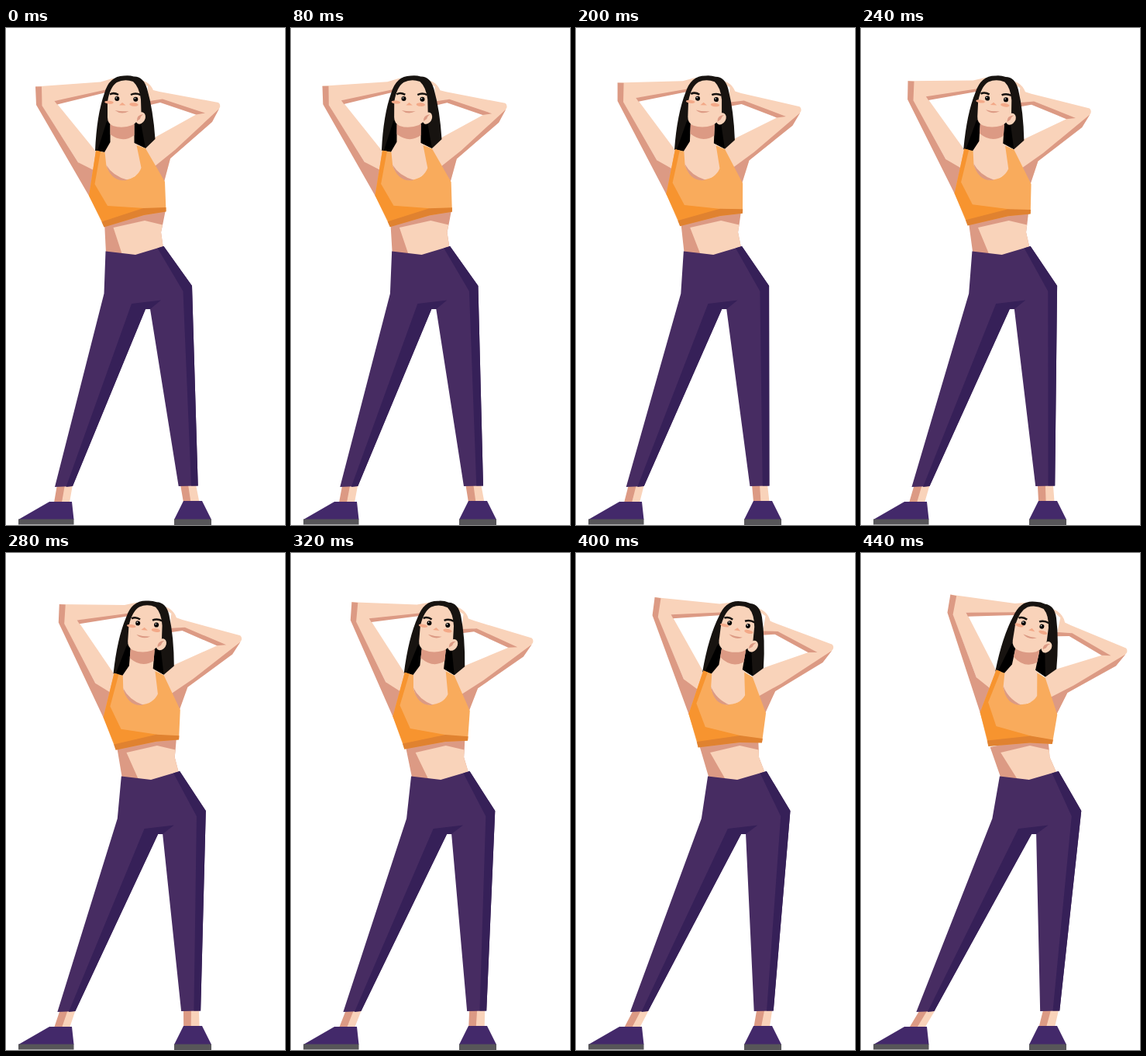
Recreate the animation shown at these times as an HTML page. Size 360 by 640 pixels, loop 0.48 s.

```html
<!DOCTYPE html>
<html lang="en">
<head>
<meta charset="utf-8">
<title>Side stretch</title>
<style>
  :root { --p: 0; --shift: calc(51px * var(--p)); }
  html, body { margin: 0; width: 100%; height: 100%; overflow: hidden; background: #fff; }
  svg { display: block; width: 360px; height: 640px; }

  /* The body leans as --p goes from 0 to 1. */
  .waist { transform-origin: 0 288px; transform: translateX(var(--shift)) skewX(calc(16.7deg * var(--p))); }
  .ankles { transform-origin: 0 612px; transform: skewX(calc(-23deg * var(--p))); }
  .legs { transform-origin: 0 651px; transform: skewX(calc(-7.9deg * var(--p))); }
  .upper { transform-origin: 156px 190px; transform: translateX(var(--shift)) rotate(calc(12deg * var(--p))); }
  .crown { transform-origin: 155px 155px; transform: rotate(calc(-3deg * var(--p))); }
  .eyes { transform: translateX(calc(-2px * var(--p))); }

  .skin { fill: #f9d3ba; }
  .shade { fill: #dc9a84; }
  .hair { fill: #171310; }
  .dark { fill: #000; }
  .top { fill: #f9ab5c; }
  .side { fill: #f7942f; }
  .hem { fill: #e08230; }
  .pants { fill: #472c62; }
  .fold { fill: #362058; }
  .shoe { fill: #43296a; }
  .sole { fill: #575659; }
  .blush { fill: #f3a988; }
  .brow { fill: none; stroke: #171310; stroke-width: 2.5; }
  .glint { fill: #fff; }
</style>
</head>
<body>
<svg viewBox="0 0 360 640">
  <g class="waist">
    <path class="shade" d="M127 250L206 234L202 254L200 263L203 284L167 294L129 290Z"/>
    <path class="skin" d="M138.500 257L179 248L202 253.500L200 263L203 284L167 294L150 292Z"/>
  </g>
  <g class="ankles">
    <path class="shade" d="M66 588H77L72.500 611H62ZM225 588H236L239 611H229Z"/>
    <path class="skin" d="M76 588H86L82 611H72ZM235 588H245L249.500 611H238.500Z"/>
  </g>
  <g class="legs">
    <path class="pants" d="M128.500 287.500L167 292L203.500 281L240 332L247.700 589.500L222.700 590L186 362H180L86 590L63 591L126.500 342Z"/>
    <path class="fold" d="M162 355L200 350.500L186 362H180L86 590L77.500 591ZM203.500 281L240 332L247.700 589.500H239L228.500 339L195.500 283.500Z"/>
  </g>
  <path class="shoe" d="M16 633L56 610H85L87.500 633ZM217 633L229 609H253L265 633Z"/>
  <path class="sole" d="M16 632.500H87.500V639.500H16ZM217 632.500H265V640H217Z"/>

  <g class="upper">
    <!-- arms -->
    <path class="skin" d="M38 75.500L122 69.500L137 65H150V79L131 82L63 94L116 159L115 190L93 173L46 100Z"/>
    <path class="shade" d="M38 75.500H46L46.500 100L93 173L113 183L107.500 217L39 99ZM62.500 94L131 79V82.500L66 98.500Z"/>
    <path class="skin" d="M165 66Q184 66 190 80L198 82L274 96Q277 98 276 102L266 120L212 168L204 198L180 185V151L192 141L246 111L200 92L183 96V75Z"/>
    <path class="shade" d="M182 94.500L202 91.500L257 109.500L245 111.500L199 96L182 100ZM275 104L266 121L212 168L204 198L192 178L218 157Z"/>

    <!-- hair, neck and chest -->
    <g class="crown">
      <path class="hair" d="M152 61.500Q133 62 127 84Q117 112 115 158L128 160L136 147V120H165V148L180 155L192.500 143Q190 106 182 78Q177 62 165 62.500Q159 60.500 152 61.500Z"/>
      <path class="dark" d="M130 120H140V140L128 160L118 158ZM161 122H174L180 155L165 148Z"/>
    </g>
    <path class="skin" d="M134.500 124H165.500V148L180 155V182L155 198L136 196L125 178L127 160L134.500 147Z"/>
    <path class="shade" d="M134.500 122H165.500V138Q151 149 134.500 137Z"/>

    <!-- sports top -->
    <path class="top" d="M116 158L127.500 160L129.500 178Q138 196 153 196Q170 193 174.500 180L168.500 151L180 155L205 198L206.500 236L178 241L126.500 256L107 216Z"/>
    <path class="shade" d="M129 176Q138 191 157 195.700Q137 200 129 176Z"/>
    <path class="side" d="M116 158L122 159L114.500 201L131 229L178 232L125 251L107 216Z"/>
    <path class="hem" d="M123.500 249.500L177 232L206.500 231V236.500L178 241L126.500 256.500Z"/>

    <!-- face -->
    <g class="crown">
      <path class="skin" d="M131 95Q134 76 143 70Q153 65 164 69Q172 76 174 92L174.500 109Q171 121 163 125Q150 130 138 126Q131 123 131 115Z"/>
      <path class="brow" d="M134 85.500Q139 82.500 145 86M161 86Q167 83 173.500 86"/>
      <g class="eyes">
        <circle cx="143.300" cy="91" r="3"/><circle cx="167.300" cy="91.700" r="3"/>
        <circle class="glint" cx="142.400" cy="90" r=".8"/><circle class="glint" cx="166.400" cy="90.700" r=".8"/>
      </g>
    </g>
    <ellipse class="skin" cx="173.500" cy="116" rx="6" ry="8" transform="rotate(28 173.500 116)"/>
    <path class="shade" d="M169 120Q168 112 177 111Q174 113 173 117Z"/>
    <ellipse class="blush" cx="133" cy="95.700" rx="5.800" ry="2" transform="rotate(4 133 95.700)"/>
    <ellipse class="blush" cx="165" cy="98.500" rx="5.700" ry="2.300" transform="rotate(4 165 98.500)"/>
    <path class="blush" d="M146 99.500L150 96L154.500 99.500Z"/>
    <path class="shade" d="M140.500 106Q149 108 158.500 107Q149 112.500 140.500 106Z"/>
  </g>
</svg>
<script>
const STEP_MS = 40, STEPS = 12;

// Quadratic ease-in, held on each step, then a hard return.
function tick(now) {
  const step = Math.floor(now / STEP_MS) % STEPS;
  document.documentElement.style.setProperty('--p', (step / (STEPS - 1)) ** 2);
  requestAnimationFrame(tick);
}
requestAnimationFrame(tick);
</script>
</body>
</html>
```
